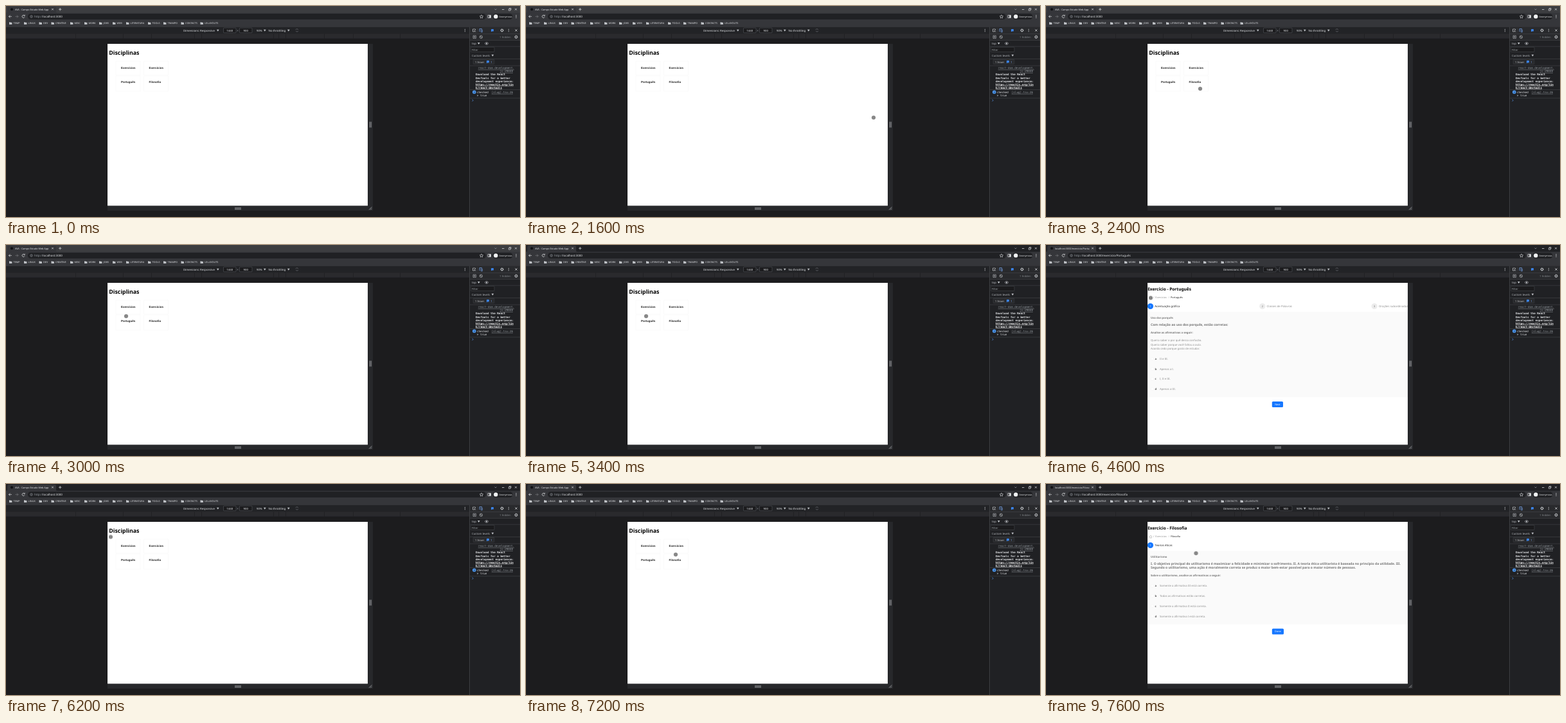
Write an HTML page that moves like this. It is 800 px wide and 329 px high and loops after 8 s.

```html
<!DOCTYPE html>
<html lang="pt">
<head>
<meta charset="utf-8">
<title>Disciplinas</title>
<style>
html, body { margin: 0; width: 100%; height: 100%; overflow: hidden; background: #1d1d1f; }
svg { display: block; width: 100%; height: 100%; }
text { font-family: "Noto Sans", "Open Sans", sans-serif; text-rendering: geometricPrecision; white-space: pre; }
.b { font-weight: 700; }
.u { text-decoration: underline; }
.mono { font-family: "DejaVu Sans Mono", monospace; }
.arial { font-family: "Liberation Sans", sans-serif; font-weight: 700; }
.end { text-anchor: end; }
.mid { text-anchor: middle; }

.home, .port, .filo, #frame, #cursor { animation: 8s step-end infinite; }
.home { animation-name: home; }
.port { animation-name: port; }
.filo { animation-name: filo; }
#frame { animation-name: focus; }
#cursor { animation-name: move; }

@keyframes home {
  0%, 77.5% { visibility: visible; }
  45%, 92.5%, 100% { visibility: hidden; }
}
@keyframes port {
  0%, 77.5%, 100% { visibility: hidden; }
  45% { visibility: visible; }
}
@keyframes filo {
  0% { visibility: hidden; }
  92.5%, 100% { visibility: visible; }
}
@keyframes focus {
  0% { fill: #3c3d40; }
  42.5%, 100% { fill: #202124; }
}
@keyframes move {
  0% { opacity: 0; transform: translate(559px, 302px); }
  12.5% { opacity: 1; transform: translate(559px, 302px); }
  15% { opacity: 1; transform: translate(557px, 240px); }
  17.5% { opacity: 1; transform: translate(550px, 190px); }
  20% { opacity: 1; transform: translate(541px, 174px); }
  22.5% { opacity: 1; transform: translate(490px, 175px); }
  25% { opacity: 1; transform: translate(424px, 176px); }
  27.5% { opacity: 1; transform: translate(325px, 156px); }
  30% { opacity: 1; transform: translate(240px, 129px); }
  32.5% { opacity: 1; transform: translate(195px, 115px); }
  35% { opacity: 1; transform: translate(178px, 112px); }
  37.5% { opacity: 1; transform: translate(187px, 111px); }
  47.5% { opacity: 1; transform: translate(186px, 109px); }
  50% { opacity: 1; transform: translate(180px, 101px); }
  52.5% { opacity: 1; transform: translate(172px, 93px); }
  55% { opacity: 1; transform: translate(168px, 90px); }
  57.5% { opacity: 1; transform: translate(163px, 82.5px); }
  80% { opacity: 1; transform: translate(172px, 87px); }
  82.5% { opacity: 1; transform: translate(196px, 98px); }
  85% { opacity: 1; transform: translate(219px, 108px); }
  87.5% { opacity: 1; transform: translate(230px, 112px); }
  90% { opacity: 1; transform: translate(233px, 110px); }
  95%, 100% { opacity: 1; transform: translate(233.5px, 108px); }
}
</style>
</head>
<body>
<svg id="stage" viewBox="0 0 800 329"></svg>
<script>
const text = (x, y, s, size, fill, cls = "") =>
  `<text x="${x}" y="${y}" font-size="${size}" fill="${fill}" class="${cls}">${s}</text>`;
const rect = (x, y, w, h, fill, r = 0, more = "") =>
  `<rect x="${x}" y="${y}" width="${w}" height="${h}" fill="${fill}" rx="${r}" ${more}/>`;
const dot = (x, y, r, fill, more = "") =>
  `<circle cx="${x}" cy="${y}" r="${r}" fill="${fill}" ${more}/>`;
const line = (d, color = "#c4c7cb", w = 0.7, more = "") =>
  `<path d="${d}" fill="none" stroke="${color}" stroke-width="${w}" ${more}/>`;
const group = (cls, ...parts) => `<g class="${cls}">${parts.join("")}</g>`;

const INK = "#e4e6e9", GREY = "#9aa0a6", BLUE = "#1677ff", SKY = "#7cacf8";
const caret = (x, y) => `<path d="M${x} ${y}h3.6l-1.8 2.9z" fill="#c4c7cb"/>`;
const cross = (x, y, r = 1.6) => line(`M${x - r} ${y - r}l${2 * r} ${2 * r}m0 ${-2 * r}l${-2 * r} ${2 * r}`, INK, 0.7);
const more = (x, y) => [-1.8, 0, 1.8].map(d => dot(x, y + d, 0.55, INK)).join("");
const gear = (x, y) => dot(x, y, 1.6, "none", 'stroke="#c4c7cb" stroke-width="1"') +
  dot(x, y, 2.3, "none", 'stroke="#c4c7cb" stroke-width=".8" stroke-dasharray=".9 .9"');
const note = (x, y) => rect(x - 2, y - 2, 4, 3.4, "#3b82e6", 0.4) +
  `<path d="M${x - 2} ${y + 1}v1.6l1.6-1.6z" fill="#3b82e6"/>`;

function tabStrip() {
  const title = (cls, s) => group(cls, text(14, 6.7, s, 3.75, INK));
  return rect(0, 0, 800, 11, "#3c3d40", 0, 'id="frame"') +
    `<path d="M0 11q2 0 2-2V3q0-2 2-2h72q2 0 2 2v6q0 2 2 2z" fill="#35363a"/>` +
    dot(9, 5.2, 2, "#111214") +
    `<clipPath id="tab"><path d="M13 0h54.5v11h-54.5z"/></clipPath><g clip-path="url(#tab)">` +
    title("home", "AVA - Campo Estudo Web App") +
    title("port", "localhost:3000/exercicio/Português") +
    title("filo", "localhost:3000/exercicio/Filosofia") + "</g>" +
    cross(72.5, 5.2, 1.3) + line("M82 5.2h4.4m-2.2-2.2v4.4", INK) +
    line("M760.5 4.5l1.5 1.5 1.5-1.5", GREY) + line("M772 5.5h3.4", INK) +
    line("M782.4 4.6h2.6v2.6h-2.6zM783.4 4.4v-1h2.6v2.6h-1", INK, 0.6) + cross(793.5, 5.2, 1.4);
}

function toolbar() {
  const path = (cls, s) =>
    group(cls, text(44, 18, `<tspan fill="${GREY}">http://</tspan>localhost:3000${s}`, 4.5, INK));
  return rect(0, 10.6, 800, 22, "#35363a") + rect(34, 12, 713, 9, "#202124", 4.5) +
    line("M8.8 16.4h-4.4m2-2l-2 2 2 2", INK) +
    line("M14.6 16.4h4.4m-2-2l2 2-2 2", "#77797d") +
    line("M28.8 15a2.1 2.1 0 1 0 .3 2.2M29.2 13.7v1.7h-1.7", INK) +
    dot(39.5, 16.4, 1.8, "none", 'stroke="#9aa0a6" stroke-width=".6"') + line("M39.5 16v1.4m0-2.2v.4", GREY, 0.5) +
    path("home", "") + path("port", "/exercicio/Português") + path("filo", "/exercicio/Filosofia") +
    `<path d="M740 13.8l.8 1.8 1.9.2-1.4 1.3.4 1.9-1.7-1-1.7 1 .4-1.9-1.4-1.3 1.9-.2z" fill="none" stroke="${INK}" stroke-width=".6"/>` +
    line("M750 14.4h4.4v4h-4.4z", INK) + rect(752.3, 14.4, 2.1, 4, INK) +
    rect(757.5, 12, 31, 9, "#202124", 4.5) + dot(762.3, 16.4, 3.2, "#f1f3f4") +
    text(767.6, 17.9, "Anonymous", 3.6, INK) + more(794, 16.4);
}

function bookmarks() {
  const items = [[5, "TEMP"], [28, "LINUX"], [51.5, "DEV"], [70.5, "CREATIVE"], [100, "MISC"], [122, "WORK"],
    [145, "JOBS"], [166, "WEB"], [187, "LITERATURA"], [221, "TOOLS"], [245, "TRAMPO"], [272.5, "CONTACTS"], [302.5, "UI-LAYOUTS"]];
  return items.map(([x, s]) =>
    `<path d="M${x} 25.2h1.6l.6.6h2.2v3h-4.4z" fill="#c4c7cb"/>` + text(x + 6.6, 28.3, s, 3.75, INK)).join("") +
    rect(0, 32.3, 800, 0.5, "#46474b");
}

function deviceBar() {
  const field = (x, s) => rect(x, 34.2, 19.5, 7.6, "#1b1b1d", 0.8, 'stroke="#5f6368" stroke-width=".5"') +
    text(x + 9.7, 39.7, s, 4.3, INK, "mid");
  const ticks = [108, 182, 226, 293, 304, 416, 424, 435, 495, 540, 613];
  return rect(0, 32.8, 721.5, 10.4, "#222326") +
    text(276, 39.7, "Dimensions: Responsive", 4.3, INK) + caret(328, 36.8) +
    field(338.5, "1440") + text(359.3, 39.6, "×", 4.5, GREY) + field(363.5, "900") +
    text(390, 39.7, "90%", 4.3, INK) + caret(401, 36.8) +
    text(408.6, 39.7, "No throttling", 4.4, INK) + caret(438, 36.8) +
    line("M450.8 37a2.2 2.2 0 0 1 4 0m.2 1.8a2.2 2.2 0 0 1-4 0", "#696c71", 0.7) + more(714.3, 38) +
    rect(0, 43.2, 721.5, 7.6, "#2a2a2d") +
    ticks.map(x => rect(x, 43.2, 0.6, 7.6, "#1d1d1f")).join("");
}

function viewport() {
  return rect(0, 50.8, 721.5, 278.2, "#1c1c1e") +
    rect(158, 59, 413, 260, "#27282b") + rect(158, 59, 405, 252.4, "#fff") +
    line("M566.2 180.5v9m2 0v-9", "#a9abae", 0.9) +
    line("M356 314.9h10m0 2h-10", "#a9abae", 0.9) +
    line("M565 317.8l4.4-4.4m-2 4.4l2-2", "#a9abae", 0.8);
}

function devtools() {
  const bold = ["Download the React", "DevTools for a better", "development experience:"];
  const link = ["https://reactjs.org/lin", "k/react-devtools"];
  const row = (y) => rect(722, y, 78, 0.5, "#4a4c50");
  return rect(721.5, 32.8, 78.5, 296.2, "#202124") + rect(721.3, 32.8, 0.7, 296.2, "#4a4c50") +
    rect(722, 32.8, 78, 20.4, "#292a2d") + row(43) + row(53) + row(62.8) +
    line("M729.5 40h-3v-4h4v2", "#c4c7cb") + line("M728.5 38l2.4 2.4", INK, 0.9) +
    line("M737 40.2v-4.6h4M739.4 37.2h2v3.4h-2z", SKY) +
    rect(733.6, 34.5, 0.4, 7, "#4a4c50") + note(757, 38) + gear(772, 38) + more(782.3, 38) + cross(794, 38) +
    line("M727 46.2h4.4v4.2h-4.4z", "#c4c7cb", 0.6) + `<path d="M728.5 47l2 1.3-2 1.3z" fill="#c4c7cb"/>` +
    dot(739.4, 48.3, 2.1, "none", 'stroke="#c4c7cb" stroke-width=".7"') + line("M738 46.9l2.9 2.9") +
    text(768.3, 49.9, "1 hidden", 4.2, "#83878c") + gear(794, 48.3) +
    text(725, 59.8, "top", 4.3, "#c4c7cb") + caret(734, 57) +
    line("M745 58.4q3-3.6 6 0q-3 3.6-6 0z", "#c4c7cb", 0.6) + dot(748, 58.4, 1, INK) +
    rect(723.3, 64.2, 36.8, 7.4, "#1b1b1d", 0.6, 'stroke="#4f5257" stroke-width=".5"') +
    text(725, 69.5, "Filter", 4.2, GREY) +
    text(725, 78.5, "Custom levels", 4.3, "#b4b8bd") + caret(755.6, 75.8) +
    row(82) + rect(727, 83.3, 33, 7.4, "#292a2d", 1, 'stroke="#46484c" stroke-width=".4"') +
    text(730, 88.5, "1 Issue:", 4.1, "#c4c7cb") + note(750, 87) + text(754.3, 88.5, "1", 4.1, SKY) + row(92.8) +
    text(791, 98.2, "react-dom.development.", 4.25, GREY, "mono u end") +
    text(789, 103, "js:29840", 4.25, GREY, "mono u end") +
    bold.map((s, i) => text(731, 108.4 + 5.1 * i, s, 4.25, INK, "mono b")).join("") +
    link.map((s, i) => text(731, 123.7 + 5 * i, s, 4.25, "#fff", "mono b u")).join("") +
    row(130.4) + dot(728.8, 134.2, 2.8, "#4b93e8") + text(728.8, 135.6, "2", 3.9, "#10263f", "mid") +
    text(733, 135.9, "checked", 4.25, INK, "mono") +
    text(789, 135.9, "[slug].tsx:26", 4.25, GREY, "mono u end") +
    `<path d="M733.4 138.3l2 1.3-2 1.3z" fill="#9aa0a6"/>` + text(738, 141.2, "true", 4.25, INK, "mono") + row(143.6) +
    line("M725.6 145.6l1.6 1.6-1.6 1.6", "#5a9cf5", 0.7);
}

function home() {
  const cards = [["Exercícios", 0, 0], ["Exercícios", 1, 0], ["Português", 0, 1], ["Filosofia", 1, 1]];
  return group("home", text(160.3, 75.6, "Disciplinas", 8.8, "#000", "b"),
    ...cards.map(([s, c, r]) =>
      rect(171 + 43.5 * c, 86 + 23 * r, 38, 22 + 2 * r, "#fff", 0.6, 'stroke="#f3f3f3" stroke-width=".4"') +
      text(179 + 43.5 * c, 98 + 22.4 * r, s, 4.5, "#222", "arial")));
}

function exercise({ cls, name, steps, bottom, topic, question, prompt, lead, options, top, button }) {
  const soft = "#8c8c8c";
  const step = (s, i) => {
    const x = 162.5 + 174.3 * i;
    return dot(x, 95.5, 4.6, i ? "#ececec" : BLUE) +
      text(x, 97, i + 1, 4, i ? "#777" : "#fff", "mid") +
      text(x + 6.8, 97, s, 4.34, i ? soft : "#222");
  };
  return group(cls,
    text(158.2, 70.6, `Exercício - ${name}`, 6.5, "#000", "b"),
    line("M160.9 82l2.1-1.9 2.1 1.9m-3.5-.4v2.5h2.8v-2.5", soft, 0.45),
    text(167, 83, `/  <tspan x="170.3">Exercicios</tspan>  <tspan x="190.7">/</tspan>`, 3.85, "#929292"),
    text(194, 83, name, 3.85, "#222"),
    ...steps.map(step),
    rect(158, 104, 405, bottom - 104, "#fafafa"),
    text(163, 114.7, topic, 4.25, "#7d7d7d", "b"),
    ...question.map((s, i) => text(163, 126.2 + 6.1 * i, s, 5.02, "#747474", "b")),
    text(163, lead.length ? 138 : 144.3, prompt, 4.24, "#747474", "b"),
    ...lead.map((s, i) => text(163, 149.9 + 6.7 * i, s, 4.25, soft)),
    ...options.map((s, i) => {
      const y = top + 15.7 * i;
      return dot(165.5, y, 2, "#fff", 'stroke="#ececec" stroke-width=".35"') +
        text(169.5, y + 1.5, "abcd"[i], 4.2, "#555", "b") + text(177, y + 1.5, s, 4.25, soft);
    }),
    rect(351.8, bottom + 6.7, button === "Next" ? 17.2 : 18.2, 9, BLUE, 1.6),
    text(button === "Next" ? 360.4 : 360.9, bottom + 12.6, button, 3.8, "#fff", "mid"));
}

const portuguese = {
  cls: "port", name: "Português", bottom: 237.3, top: 177.5, button: "Next",
  steps: ["Acentuação gráfica", "Classes de Palavras", "Orações subordinadas"],
  topic: "Uso dos porquês",
  question: ["Com relação ao uso dos porquês, estão corretas:"],
  prompt: "Analise as afirmativas a seguir:",
  lead: ["Queria saber o por quê dessa confusão.", "Queria saber porque você faltou a aula.", "Acordo cedo porque gosto de estudar."],
  options: ["II e III.", "Apenas a I.", "I, II e III.", "Apenas a III."]
};
const philosophy = {
  cls: "filo", name: "Filosofia", bottom: 218.8, top: 158.9, button: "Done",
  steps: ["Teorias éticas"],
  topic: "Utilitarismo",
  question: [
    "I. O objetivo principal do utilitarismo é maximizar a felicidade e minimizar o sofrimento. II. A teoria ética utilitarista é baseada no princípio da utilidade. III.",
    "Segundo o utilitarismo, uma ação é moralmente correta se produz o maior bem-estar possível para o maior número de pessoas."],
  prompt: "Sobre o utilitarismo, analise as afirmativas a seguir:",
  lead: [],
  options: ["Somente a afirmativa III está correta.", "Todas as afirmativas estão corretas.",
    "Somente a afirmativa II está correta.", "Somente a afirmativa I está correta."]
};

document.getElementById("stage").innerHTML =
  tabStrip() + toolbar() + bookmarks() + deviceBar() + viewport() + devtools() +
  `<clipPath id="page"><path d="M158 59h405v252.4h-405z"/></clipPath><g clip-path="url(#page)">` +
  home() + exercise(portuguese) + exercise(philosophy) + "</g>" +
  dot(0, 0, 2.8, "#6e6e6e", 'id="cursor" fill-opacity=".82" stroke="#6a6a6a" stroke-width=".5"');
</script>
</body>
</html>
```
